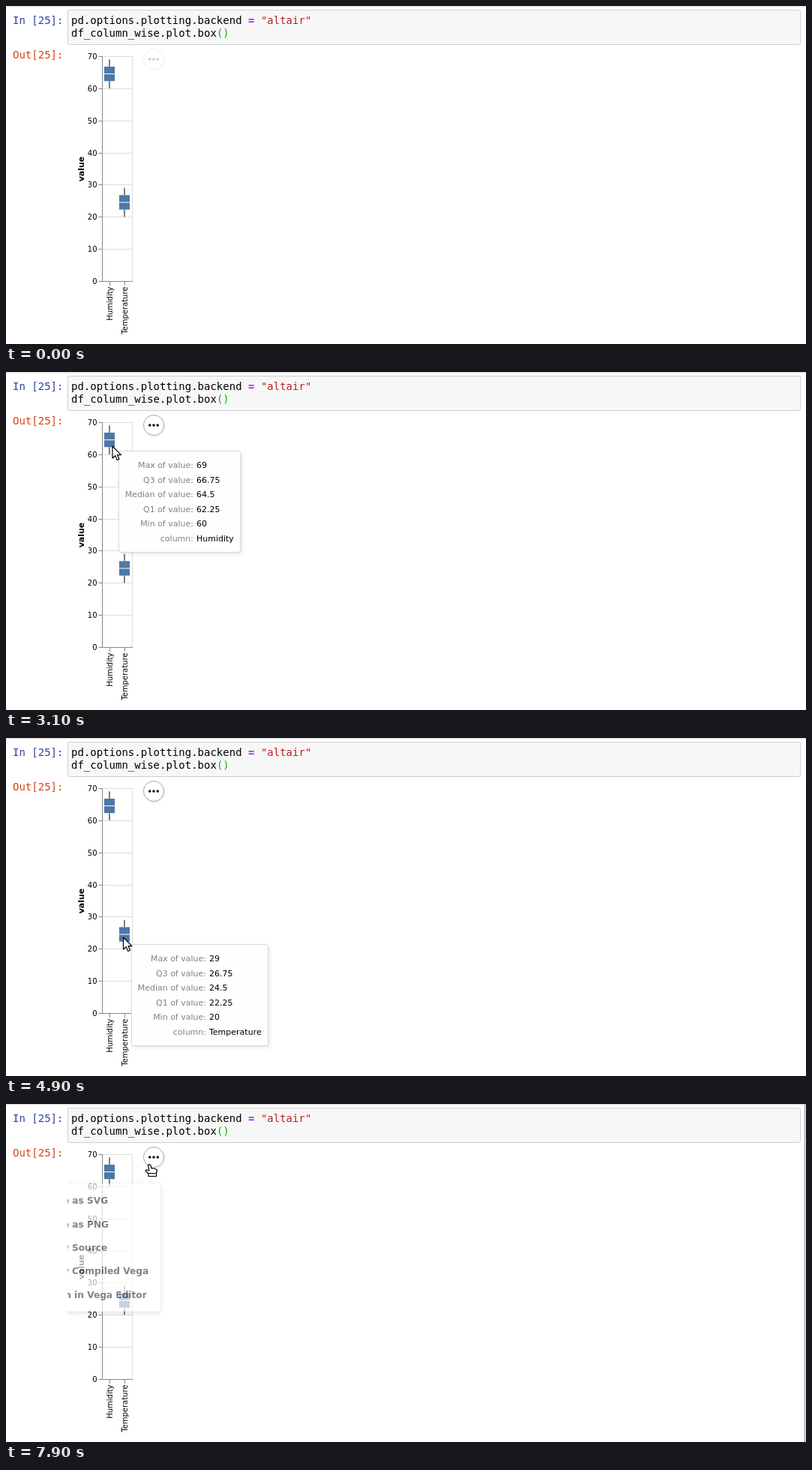
These frames come from a looping animation (1067x451 px, 8000 ms). An HTML page:

```html
<!DOCTYPE html>
<html lang="en">
<head>
<meta charset="utf-8">
<title>Box plot tooltips</title>
<style>
  html, body { margin: 0; width: 100%; height: 100%; overflow: hidden; background: #fff; }
  svg { display: block; width: 1067px; height: 451px; }
  text { font: 10px "DejaVu Sans", sans-serif; }
  .code text { font: 14px "DejaVu Sans Mono", monospace; }
  .axis { stroke: #888; fill: none; }
  .grid { stroke: #ddd; fill: none; }
  .end { text-anchor: end; }
  .tip text { font-size: 11px; }
  .tip rect { fill: #fff; fill-opacity: .95; stroke: #d9d9d9; filter: drop-shadow(2px 2px 2px rgba(0,0,0,.1)); }
  .key { fill: #808080; text-anchor: end; }
  #menu text { font-size: 14px; font-weight: bold; fill: #434a56; }
  #button circle:first-child { fill: #fff; stroke: #aaa; filter: drop-shadow(1px 1px 1.5px rgba(0,0,0,.1)); }
  .cursor { fill: #fff; stroke: #000; stroke-width: 1.2; stroke-linejoin: round; }
</style>
</head>
<body>
<svg viewBox="0 0 1067 451">
  <defs><clipPath id="output"><rect x="82" y="52" width="985" height="399"/></clipPath></defs>
  <rect width="1067" height="1" fill="#e0e0e0"/>
  <rect y="1" width="1067" height="1" fill="#f3f3f3"/>
  <rect x="82.5" y="5.5" width="977" height="46" rx="2" fill="#f7f7f7" stroke="#cfcfcf"/>
  <g class="code">
    <text x="9" y="24" fill="#303f9f">In [25]:</text>
    <text x="9" y="70" fill="#d84315">Out[25]:</text>
    <text x="87" y="24">pd.options.plotting.backend <tspan fill="#a2f" font-weight="bold">=</tspan> <tspan fill="#ba2121">"altair"</tspan></text>
    <text x="87" y="41">df_column_wise.plot.box<tspan fill="#0b0">()</tspan></text>
  </g>
  <g id="chart"></g>
  <g id="button">
    <circle cx="197" cy="71" r="13.5"/>
    <circle cx="191.75" cy="71" r="1.75"/>
    <circle cx="197" cy="71" r="1.75"/>
    <circle cx="202.25" cy="71" r="1.75"/>
  </g>
  <g id="tips"></g>
  <g clip-path="url(#output)"><g id="menu">
    <g style="filter: drop-shadow(0 2px 4px rgba(0,0,0,.2))">
      <path d="M67.5 -97.5L74.5 -104.5L81.5 -97.5Z" fill="#fff"/>
      <rect x="-97.6" y="-98" width="195.2" height="196" rx="4" fill="#fff"/>
    </g>
  </g></g>
  <path id="edge" d="M1065.5 0V451" stroke="#888"/>
  <path id="arrow" class="cursor" d="M0 0V16L3.7 12.6L6.3 18.5L9 17.3L6.5 11.6H11.5Z"/>
  <path id="hand" class="cursor" d="M-2.5 1.7Q-1 -.3 .7 1.5L2 6Q6 5.5 9 7.5Q10.2 9 8.5 12V16.5H-2V13L-5.5 9.5Q-6 7.3 -3.5 8L-1 9ZM-2 12.5H8.5"/>
</svg>
<script>
const $ = id => document.getElementById(id);
const LOOP = 8000, STEP = 100, TIP_LAG = 40;
const yOf = v => 367 - v * 300 / 70;
const show = (el, on) => el.style.display = on ? "" : "none";
const clamp = v => Math.max(0, Math.min(1, v));

const boxes = [
  { name: "Humidity", x: 138, stats: [69, 66.75, 64.5, 62.25, 60], width: 162 },
  { name: "Temperature", x: 158, stats: [29, 26.75, 24.5, 22.25, 20], width: 182 }
];

// time, x, y of the pointer tip
const path = [
  [400, 69, -8], [600, 95, 25], [900, 122, 70], [1100, 131, 83], [1200, 136, 88],
  [3000, 136, 88], [3100, 142, 99], [3500, 156, 178], [3800, 157, 252], [3900, 156.5, 257],
  [4600, 156.5, 257], [4900, 156.5, 266], [6800, 156.5, 266], [6900, 155.5, 265],
  [7100, 139, 210], [7300, 131, 145], [7450, 160, 105], [7600, 192, 80], [8000, 192, 80]
];

function pointer(t) {
  const i = path.findIndex(p => p[0] > t);
  if (i < 1) return null;
  const [t0, x0, y0] = path[i - 1], [t1, x1, y1] = path[i];
  const k = (t - t0) / (t1 - t0);
  return { x: x0 + (x1 - x0) * k, y: y0 + (y1 - y0) * k };
}

function isOver(box, p) {
  const dx = Math.abs(p.x - box.x), [max, q3, , q1, min] = box.stats.map(yOf);
  return dx <= 7 && p.y >= q3 && p.y <= q1 || dx <= 2 && p.y >= max && p.y <= min;
}

function drawChart() {
  let s = '<rect class="grid" x="128.5" y="67.5" width="40" height="300"/>';
  for (let v = 0; v <= 70; v += 10) {
    const y = Math.round(yOf(v)) + .5;
    s += `<path class="grid" d="M128 ${y}H168"/><path class="axis" d="M123.5 ${y}H128.5"/>
      <text class="end" x="121.5" y="${y + 3}">${v}</text>`;
  }
  s += '<path class="axis" d="M128.5 67V368M128 367.5H169"/>';
  for (const { name, x, stats } of boxes) {
    const [max, q3, mid, q1, min] = stats.map(yOf);
    s += `<path class="axis" d="M${x + .5} 367V373"/>
      <text class="end" transform="translate(${x + 3.5} 374.5) rotate(-90)">${name}</text>
      <path d="M${x} ${max}V${q3}M${x} ${q1}V${min}" stroke="#000"/>
      <rect x="${x - 7}" y="${q3}" width="14" height="${q1 - q3}" fill="#4c78a8"/>
      <path d="M${x - 7} ${mid}h14" stroke="#fff"/>`;
  }
  s += '<text transform="translate(103.5 217.5) rotate(-90)" text-anchor="middle" style="font-size:11px;font-weight:bold">value</text>';
  $("chart").innerHTML = s;
}

function drawTips() {
  const keys = ["Max", "Q3", "Median", "Q1", "Min"].map(k => k + " of value:").concat("column:");
  $("tips").innerHTML = boxes.map(b => `<g class="tip"><rect x=".5" y=".5" width="${b.width}" height="135" rx="3"/>` +
    [...b.stats, b.name].map((v, i) => {
      const y = Math.round(23 + 19.6 * i);
      return `<text class="key" x="100" y="${y}">${keys[i]}</text><text x="104" y="${y}">${v}</text>`;
    }).join("") + "</g>").join("");
}

function drawMenu() {
  const items = ["Save as SVG", "Save as PNG", "View Source", "View Compiled Vega", "Open in Vega Editor"];
  $("menu").innerHTML += items.map((s, i) => `<text x="-80.6" y="${36 * (i - 2) + 5}">${s}</text>`).join("");
}

function render(t) {
  const p = pointer(t), lag = pointer(t - TIP_LAG);
  const onButton = p && Math.hypot(p.x - 197, p.y - 71) < 14;
  show($("arrow"), p && !onButton);
  show($("hand"), onButton);
  if (p) for (const id of ["arrow", "hand"]) $(id).setAttribute("transform", `translate(${p.x} ${p.y})`);

  boxes.forEach((box, i) => {
    const tip = $("tips").children[i], on = lag && isOver(box, lag);
    show(tip, on);
    if (on) tip.setAttribute("transform", `translate(${Math.ceil(lag.x + 10)} ${Math.ceil(lag.y + 10)})`);
  });

  $("button").style.opacity = .2 + .8 * clamp((t - 800) / 400) ** 1.7;
  const open = clamp((t - 7800) / 148);
  show($("menu"), open > 0);
  $("menu").style.opacity = open;
  $("menu").setAttribute("transform", `translate(121 191.5) scale(${.6 + .4 * open})`);
  show($("edge"), t >= 7800);
}

drawChart();
drawTips();
drawMenu();
const start = performance.now();
function tick() {
  const t = (performance.now() - start) % LOOP;
  render(Math.floor(t / STEP) * STEP);
  requestAnimationFrame(tick);
}
tick();
</script>
</body>
</html>
```
